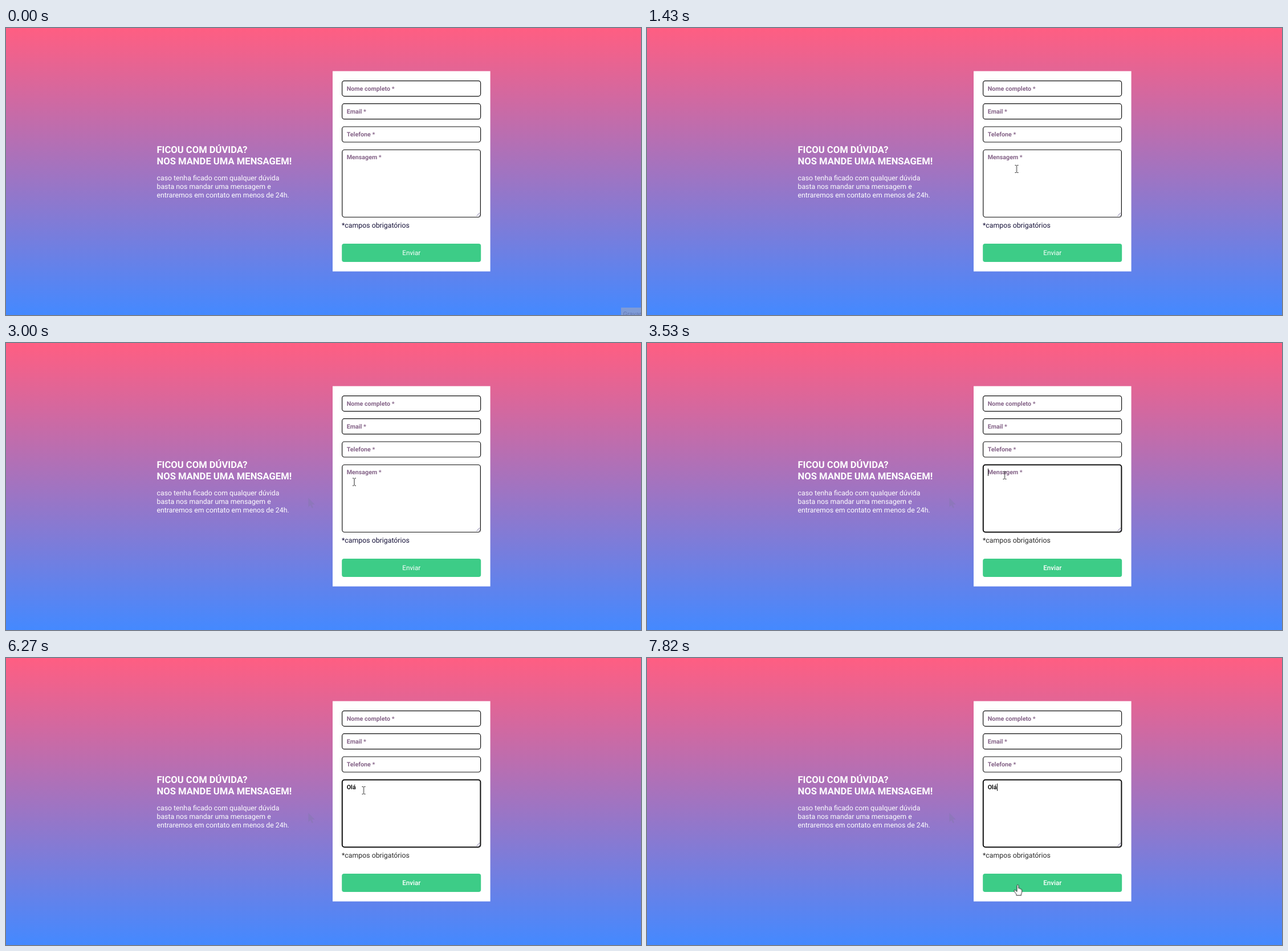
These frames come from a looping animation (1114 by 503 pixels, 8000 ms). An HTML page:

```html
<!DOCTYPE html>
<html lang="pt">
<head>
<meta charset="utf-8">
<title>Formulário de contato</title>
<style>
html, body { margin: 0; width: 100%; height: 100%; overflow: hidden; }
svg { display: block; width: 100%; height: 100%; }
text { font-family: Roboto, Arial, sans-serif; text-rendering: geometricPrecision; white-space: pre; }

.title { font-size: 16.6px; font-weight: 700; fill: #fff; }
.body { font-size: 12.3px; fill: #fff; }
.label { font-size: 10.7px; font-weight: 700; fill: #856488; }
.typed { font-size: 10.7px; font-weight: 700; fill: #111; }
.field { fill: #fff; stroke: #111; stroke-width: 1.2; }
.note { font-size: 12.33px; }
.send { font-size: 11.7px; fill: #fff; text-anchor: middle; }
.pen { fill: #fff; stroke: #222; stroke-width: 1; stroke-linejoin: round; }

/* 1% of the loop is 80 ms */
.note, .send, .area, .hint, .typed, .caret, .tip, .ghost, .arrow, .beam, .hand {
  animation: 8s step-end infinite;
}
.tip { animation-name: tip; }
.note { animation-name: note; }
.send { animation-name: send; }
.area { animation-name: area; }
.hint { animation-name: hint; }
.t1 { animation-name: t1; }
.t2 { animation-name: t2; }
.t3 { animation-name: t3; }
.caret { animation-name: caret; }
.ghost { animation-name: ghost; }
.arrow { animation-name: arrow; }
.beam { animation-name: beam; }
.hand { animation-name: hand; }
.cursor { animation: move 8s linear infinite; }

@keyframes tip { 0% { opacity: 1; } .875% { opacity: .45; } 1.5%, 100% { opacity: 0; } }
@keyframes note { 0% { fill: #17133a; } 43.31%, 100% { fill: #2b2b2b; } }
@keyframes send { 0% { font-weight: 400; } 43.31%, 100% { font-weight: 500; } }
@keyframes area { 0% { stroke-width: 1.2; } 43.31%, 100% { stroke-width: 2; } }
@keyframes hint { 0% { opacity: 1; } 59.25%, 100% { opacity: 0; } }
@keyframes t1 { 0% { opacity: 0; } 59.25% { opacity: 1; } 61.75%, 100% { opacity: 0; } }
@keyframes t2 { 0% { opacity: 0; } 61.75% { opacity: 1; } 70.875%, 100% { opacity: 0; } }
@keyframes t3 { 0% { opacity: 0; } 70.875%, 100% { opacity: 1; } }
@keyframes caret {
  0% { opacity: 0; transform: translateX(598px); }
  43.31% { opacity: 1; transform: translateX(598px); }
  49.875% { opacity: 0; transform: translateX(598px); }
  56.75% { opacity: 1; transform: translateX(598px); }
  59.25% { opacity: 1; transform: translateX(605px); }
  61.75% { opacity: 1; transform: translateX(608px); }
  68.375% { opacity: 0; transform: translateX(608px); }
  70.875% { opacity: 1; transform: translateX(614px); }
  78.375% { opacity: 0; transform: translateX(614px); }
  84.125% { opacity: 1; transform: translateX(614px); }
  90.75% { opacity: 0; transform: translateX(614px); }
  97.375%, 100% { opacity: 1; transform: translateX(614px); }
}
@keyframes ghost { 0% { opacity: 0; } 35.8%, 100% { opacity: .6; } }

@keyframes arrow {
  0% { opacity: 0; }
  6.5% { opacity: 1; }
  11.65% { opacity: 0; }
  26.375% { opacity: 1; }
  28.1% { opacity: 0; }
  30.7% { opacity: 1; }
  36.6% { opacity: 0; }
  95.2% { opacity: 1; }
  96.05%, 100% { opacity: 0; }
}
@keyframes beam {
  0% { opacity: 0; }
  11.65% { opacity: 1; }
  26.375% { opacity: 0; }
  28.1% { opacity: 1; }
  30.7% { opacity: 0; }
  36.6% { opacity: 1; }
  95.2%, 100% { opacity: 0; }
}
@keyframes hand { 0% { opacity: 0; } 96.05%, 100% { opacity: 1; } }

/* the pointer is redrawn about every 68 ms */
@keyframes move {
  0% { transform: translate(1035px, 495px); animation-timing-function: step-end; }
  6.5% { transform: translate(1035px, 495px); animation-timing-function: steps(3); }
  9.09% { transform: translate(868px, 392px); animation-timing-function: steps(4); }
  12.545% { transform: translate(735px, 302px); animation-timing-function: steps(4); }
  16% { transform: translate(669.5px, 261px); animation-timing-function: step-end; }
  17% { transform: translate(655.5px, 252px); animation-timing-function: step-end; }
  17.875% { transform: translate(648.5px, 247px); animation-timing-function: steps(2); }
  19.575% { transform: translate(652.5px, 242px); animation-timing-function: steps(4); }
  22.975% { transform: translate(677.5px, 290px); animation-timing-function: steps(4); }
  26.375% { transform: translate(661px, 358px); animation-timing-function: step-end; }
  27.25% { transform: translate(657px, 359px); animation-timing-function: steps(3); }
  29.875% { transform: translate(607.5px, 327px); animation-timing-function: steps(2); }
  31.575% { transform: translate(538px, 286px); animation-timing-function: steps(2); }
  33.26% { transform: translate(494px, 276px); animation-timing-function: steps(2); }
  34.94% { transform: translate(530px, 271px); animation-timing-function: steps(2); }
  36.625% { transform: translate(598.5px, 250.5px); animation-timing-function: step-end; }
  37.5% { transform: translate(611px, 243.5px); animation-timing-function: steps(4); }
  40.75% { transform: translate(627.5px, 232px); animation-timing-function: step-end; }
  88.375% { transform: translate(627.5px, 237.5px); animation-timing-function: steps(4); }
  91.78% { transform: translate(629px, 268px); animation-timing-function: steps(4); }
  95.2% { transform: translate(644px, 372px); animation-timing-function: steps(2); }
  96.9% { transform: translate(650.5px, 404px); animation-timing-function: step-end; }
  97.75%, 100% { transform: translate(650.5px, 397.5px); }
}
</style>
</head>
<body>
<svg viewBox="0 0 1114 503" preserveAspectRatio="none">
  <defs>
    <linearGradient id="sky" x2="0" y2="1">
      <stop stop-color="#ff5e82"/>
      <stop offset="1" stop-color="#4489ff"/>
    </linearGradient>
    <path id="pointer" d="M.5 .5V16.5L4.2 13 6.6 18.5 9 17.5 6.6 12H11.6Z"/>
  </defs>

  <rect width="1114" height="503" fill="url(#sky)"/>

  <g class="title">
    <text x="264.5" y="219">FICOU COM DÚVIDA?</text>
    <text x="264.5" y="238.5">NOS MANDE UMA MENSAGEM!</text>
  </g>
  <g class="body">
    <text x="264.5" y="266.5">caso tenha ficado com qualquer dúvida</text>
    <text x="264.5" y="281.5">basta nos mandar uma mensagem e</text>
    <text x="264.5" y="296.5">entraremos em contato em menos de 24h.</text>
  </g>

  <rect x="573" y="75.6" width="276.6" height="351" fill="#fff"/>
  <g class="field">
    <rect x="589.6" y="92.6" width="243" height="27" rx="4"/>
    <rect x="589.6" y="132.7" width="243" height="27" rx="4"/>
    <rect x="589.6" y="173" width="243" height="27" rx="4"/>
    <rect class="area" x="589.8" y="213.5" width="242.6" height="118" rx="4"/>
  </g>
  <path d="M825.5 329.5l5.5-5.5M829 329.8l2.3-2.3" stroke="#77709c" fill="none"/>
  <g class="label">
    <text x="597.7" y="109.6">Nome completo *</text>
    <text x="597.7" y="149.8">Email *</text>
    <text x="597.7" y="190.1">Telefone *</text>
    <text class="hint" x="597.7" y="230.2">Mensagem *</text>
  </g>
  <text class="typed t1" x="597.7" y="230.2">O</text>
  <text class="typed t2" x="597.7" y="230.2">Ol</text>
  <text class="typed t3" x="597.7" y="230.2">Olá</text>
  <rect class="caret" y="220" width="1" height="13" fill="#111"/>

  <text class="note" x="589" y="350">*campos obrigatórios</text>
  <rect x="589.2" y="378" width="244" height="32" rx="4" fill="#3dcc87"/>
  <text class="send" x="711.3" y="398">Enviar</text>

  <g class="tip">
    <rect x="1079" y="490" width="35" height="13" fill="#7f9bd6"/>
    <text x="1082.5" y="504.5" font-size="11" fill="#6377b4">Gravar</text>
  </g>

  <use class="ghost" href="#pointer" x="530" y="271" fill="#8878b2"/>

  <g class="cursor">
    <use class="arrow pen" href="#pointer"/>
    <path class="beam" fill="none" stroke="#222" d="M-3-6.5H-1L0-5.5 1-6.5H3M0-5.5V5.5M-3 6.5H-1L0 5.5 1 6.5H3"/>
    <path class="hand pen" d="M-1.5 1.5C-1.5-.4 1.3-.4 1.3 1.5V6.2C2.6 5.4 3.6 6 3.8 7.2 5 6.5 5.7 7.2 5.8 8.2 6.8 7.9 7.2 8.6 7.2 9.6V12.5C7.2 14 6.2 15 6 16.2V18.5H-2.5V16.8C-3.2 15-5.6 12.8-6.5 10.8-7 9.4-5.2 8.6-4 9.6L-1.5 12Z"/>
  </g>
</svg>
</body>
</html>
```
